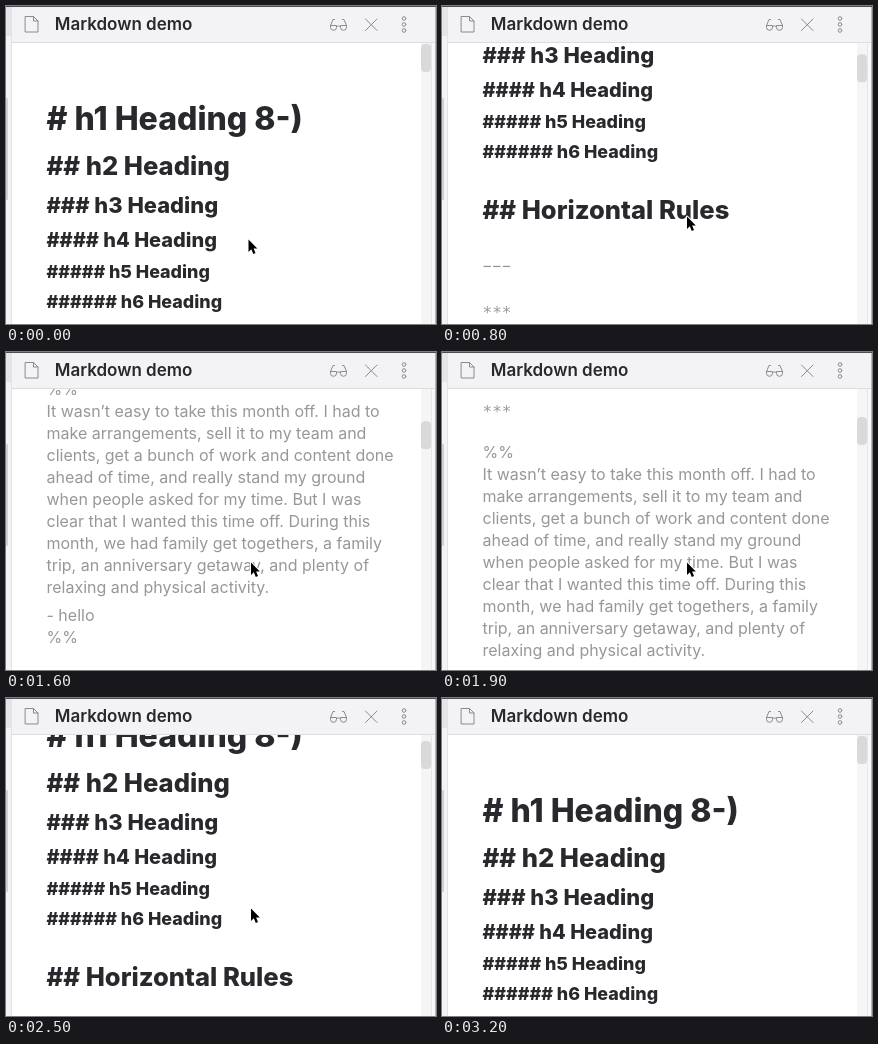
Write an HTML page with a canvas that moves like this. It is 430 px wide and 318 px high and loops after 4.2 s.

```html
<!DOCTYPE html>
<html lang="en">
<head>
<meta charset="utf-8">
<title>Markdown demo</title>
<style>
  html, body { margin: 0; width: 100%; height: 100%; overflow: hidden; background: #fff; }
  canvas { display: block; width: 430px; height: 318px; }
</style>
</head>
<body>
<canvas id="stage" width="430" height="318"></canvas>
<script>
const ctx = document.getElementById('stage').getContext('2d');
const LOOP = 4200, STEP = 100, BASE = 16, LEFT = 40.5;
const SANS = 'Inter, "Open Sans", sans-serif';
const MONO = '"DejaVu Sans Mono", monospace';
const THIN_MONO = '"Noto Sans Mono", monospace';
const INK = '#28292c', FAINT = '#979797', ICON = '#8b8b8d', PANEL = '#f3f3f5';

// Scroll keys: time, offset, speed
const SCROLL = [
  [300, 0, 0], [800, 150, .414], [1200, 373, .39], [1600, 460, 0],
  [1700, 460, 0], [2100, 287, -.48], [2500, 75, -.36], [2900, 0, 0]
];

const lines = [];
const heading = (text, em, y) => lines.push({ text, y, color: INK, font: `800 ${BASE * em}px ${SANS}` });
const faint = (text, y, family = SANS) => lines.push({ text, y, color: FAINT, font: `400 ${BASE}px ${family}` });

heading('# h1 Heading 8-)', 2, 124);
heading('## h2 Heading', 1.6, 169);
heading('### h3 Heading', 1.37, 207);
heading('#### h4 Heading', 1.25, 241);
heading('##### h5 Heading', 1.12, 272);
heading('###### h6 Heading', 1.12, 302);
heading('## Horizontal Rules', 1.6, 362.5);
faint('\u2212\u2212\u2212', 415.5, THIN_MONO);
faint('***', 462, MONO);
[
  '%%',
  'It wasn’t easy to take this month off. I had to',
  'make arrangements, sell it to my team and',
  'clients, get a bunch of work and content done',
  'ahead of time, and really stand my ground',
  'when people asked for my time. But I was',
  'clear that I wanted this time off. During this',
  'month, we had family get togethers, a family',
  'trip, an anniversary getaway, and plenty of',
  'relaxing and physical activity.'
].forEach((text, i) => faint(text, 503 + i * 22));
faint('- hello', 728.5);
faint('%%', 750.5);

function scrollAt(t) {
  if (t <= SCROLL[0][0]) return 0;
  for (let i = 1; i < SCROLL.length; i++) {
    const [t0, y0, v0] = SCROLL[i - 1], [t1, y1, v1] = SCROLL[i];
    if (t > t1) continue;
    const d = t1 - t0, u = (t - t0) / d, w = 1 - u;
    return w * w * ((1 + 2 * u) * y0 + u * d * v0) + u * u * ((3 - 2 * u) * y1 - w * d * v1);
  }
  return 0;
}

function cursorAt(t) {
  if (t >= 3200) return null;
  if (t < 100 || t >= 3100) return [242.5, 233.5];
  if (t < 200) return [244, 222];
  return [245, 210.5];
}

function box(x, y, w, h, color, r = 0) {
  ctx.fillStyle = color;
  ctx.beginPath();
  ctx.roundRect(x, y, w, h, r);
  ctx.fill();
}

function label(text, x, y, font, color) {
  ctx.font = font;
  ctx.fillStyle = color;
  ctx.fillText(text, x, y);
}

function drawPath(d) {
  ctx.stroke(new Path2D(d));
}

function drawPage(scroll) {
  ctx.save();
  ctx.beginPath();
  ctx.rect(6, 37, 419, 281);
  ctx.clip();
  for (const l of lines) {
    const y = l.y - scroll;
    if (y > 20 && y < 350) label(l.text, LEFT, y, l.font, l.color);
  }
  box(415, 37, 10, 281, '#f5f5f6');
  box(415, 38 + scroll * .068, 10, 28, '#d9d9da', 4);
  ctx.restore();
}

function drawHeader() {
  box(6, 1, 424, 35, PANEL);
  box(6, 36, 424, 1, '#dddddf');
  label('Markdown demo', 48.7, 24, `600 17px ${SANS}`, INK);

  ctx.strokeStyle = ICON;
  ctx.lineWidth = 1;
  ctx.lineJoin = ctx.lineCap = 'round';
  drawPath('M19.5 10.5H27.5L32 15V26H19.5ZM27.5 10.5V15H32');
  drawPath('M359.5 13L371 24.5M371 13L359.5 24.5');
  drawPath('M328.5 13.5H327L324.5 19.5H330.5V21.3A3 3 0 0 1 324.5 21.3V19.5');
  drawPath('M336.5 13.5H338L340.5 19.5H334.5V21.3A3 3 0 0 0 340.5 21.3V19.5');
  drawPath('M330.5 20.5Q332.5 19 334.5 20.5');
  for (const y of [12.5, 18.5, 24.5]) {
    ctx.beginPath();
    ctx.arc(398, y, 1.8, 0, Math.PI * 2);
    ctx.stroke();
  }
}

function drawFrame() {
  box(0, 0, 6, 318, PANEL);
  box(0, 0, 5, 30, '#e3e5e8');
  box(0, 92, 2, 102, '#cfd0d2', 1);
  box(5, 1, 1, 317, '#e2e3e5');
  box(425, 37, 5, 281, '#f8f8f9');
  box(425, 37, 1, 281, '#e6e7e9');
  box(429, 0, 1, 318, '#b5b6b8');
  box(0, 0, 430, 1, '#4c4d50');
}

function drawCursor([x, y]) {
  const arrow = new Path2D('M0 0V12.4L2.8 9.8L4.8 14.6L7 13.6L5.1 8.9H8.8Z');
  ctx.save();
  ctx.translate(x, y);
  ctx.lineJoin = 'round';
  ctx.lineWidth = 2;
  ctx.strokeStyle = '#fff';
  ctx.stroke(arrow);
  ctx.fillStyle = '#000';
  ctx.fill(arrow);
  ctx.restore();
}

function draw(now) {
  const t = Math.floor((now % LOOP) / STEP) * STEP;
  box(0, 0, 430, 318, '#fff');
  drawPage(scrollAt(t));
  drawHeader();
  drawFrame();
  const cursor = cursorAt(t);
  if (cursor) drawCursor(cursor);
}

const start = performance.now();
function tick() {
  draw(performance.now() - start);
  requestAnimationFrame(tick);
}
tick();
</script>
</body>
</html>
```
